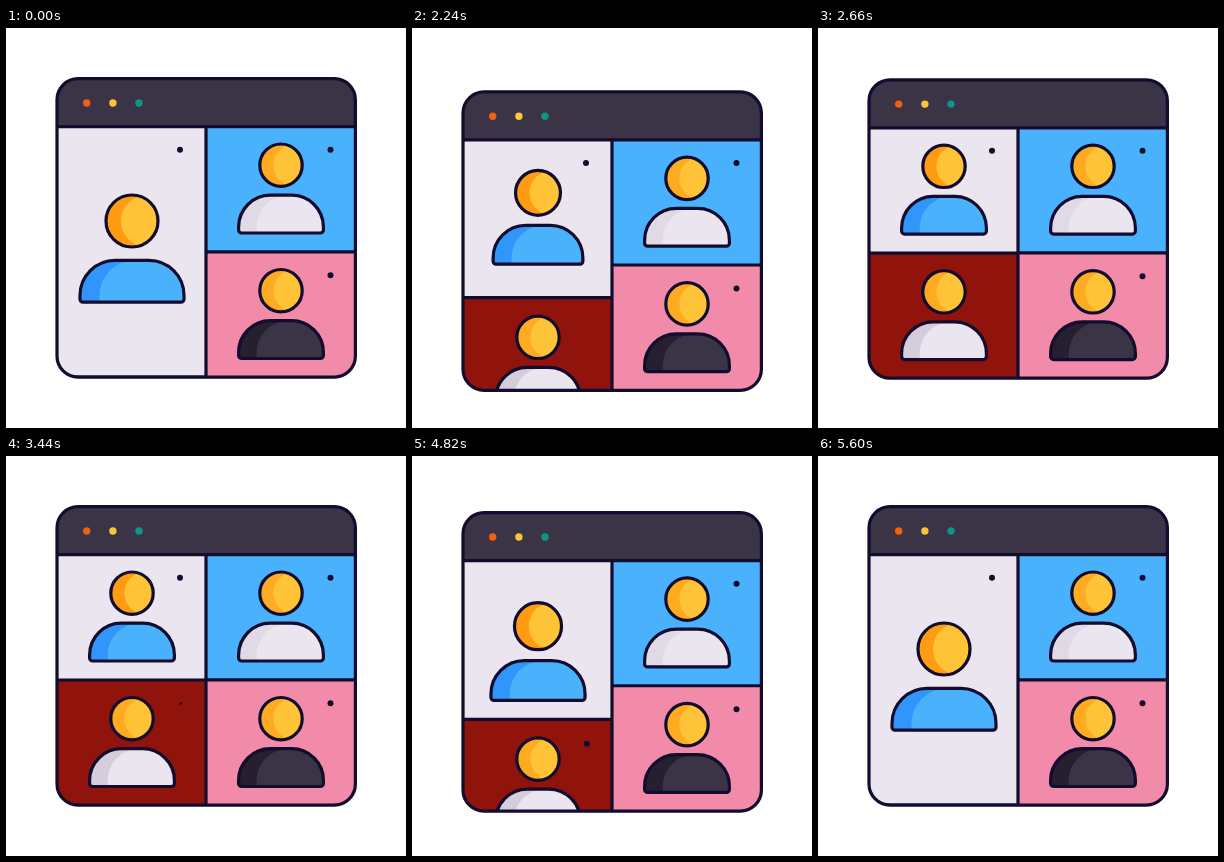
These frames come from a looping animation (400x400 px, 5.63 s). An HTML page with a canvas:

```html
<!DOCTYPE html>
<html lang="en">
<head>
<meta charset="utf-8">
<title>Video call window</title>
<style>
  html, body { margin: 0; width: 100%; height: 100%; overflow: hidden; background: #fff; }
  canvas { display: block; width: 400px; height: 400px; }
</style>
</head>
<body>
<canvas id="stage"></canvas>
<script>
const canvas = document.getElementById('stage');
const ctx = canvas.getContext('2d');
const ratio = window.devicePixelRatio || 1;
canvas.width = canvas.height = 400 * ratio;

const LOOP = 5630, OPEN = 2015, CLOSE = 4700;
const INK = '#120c2e', DARK = '#3b3446', PALE = '#ebe5ef', BLUE = '#4ab1fd';
const GOLD = '#ffc338', AMBER = '#ffab22';

const progress = (t, start, length) => Math.min(1, Math.max(0, (t - start) / length));
const easeOut = u => 1 - (1 - u) ** 2;
const easeSine = u => (1 - Math.cos(Math.PI * u)) / 2;
const mix = (a, b, u) => a + (b - a) * u;

// Quick dip followed by a softer return
function dip(t, start, height, down, up) {
  return t < start + down
    ? height * easeSine(progress(t, start, down))
    : height * (1 - easeOut(progress(t, start + down, up)));
}

function rect(x, y, w, h, color) {
  ctx.fillStyle = color;
  ctx.fillRect(x, y, w, h);
}

function dot(x, y, r, color = INK) {
  ctx.beginPath();
  ctx.arc(x, y, r, 0, 7);
  ctx.fillStyle = color;
  ctx.fill();
}

function line(x1, y1, x2, y2) {
  ctx.beginPath();
  ctx.moveTo(x1, y1);
  ctx.lineTo(x2, y2);
  ctx.stroke();
}

// Outlined shape whose lit part is the same shape shifted to the right
function shaded(path, shift, light, shade) {
  ctx.save();
  ctx.clip(path);
  ctx.fillStyle = shade;
  ctx.fill(path);
  ctx.translate(shift, 0);
  ctx.fillStyle = light;
  ctx.fill(path);
  ctx.restore();
  ctx.stroke(path);
}

function person(x, head, r, top, bottom, half, light, shade, headShade = AMBER) {
  const face = new Path2D();
  face.arc(x, head, r, 0, 7);
  shaded(face, mix(13.5, 15, (r - 21) / 5), GOLD, headShade);
  const body = new Path2D();
  const curve = (bottom - top) * 0.84;
  body.roundRect(x - half, top, half * 2, bottom - top, [curve, curve, 3, 3]);
  shaded(body, mix(18, 19.5, (r - 21) / 5), light, shade);
}

const smallPerson = (x, y, light, shade) =>
  person(x, y + 137.2, 21.2, y + 167.2, y + 205, 42.4, light, shade);

function draw(t) {
  const closing = t >= CLOSE;
  const dy = dip(t, 2000, 13.4, 260, 560) + dip(t, 3710, 4, 140, 310) + dip(t, CLOSE, 13.4, 260, 560);
  const figure = closing ? 1 - easeOut(progress(t, CLOSE, 430)) : easeOut(progress(t, OPEN, 460));
  const split = closing ? 1 - easeSine(progress(t, CLOSE, 350)) : easeOut(progress(t, OPEN, 460));
  const splitY = mix(349, 224, split);
  const lower = 125.5 + 129 * (1 - split);

  ctx.setTransform(ratio, 0, 0, ratio, 0, 0);
  rect(0, 0, 400, 400, '#fff');
  ctx.translate(0, dy);
  ctx.strokeStyle = INK;
  ctx.lineWidth = 3.2;
  ctx.lineJoin = 'round';

  const frame = new Path2D();
  frame.roundRect(51, 50.7, 298.4, 298.4, 21);
  ctx.save();
  ctx.clip(frame);
  rect(50, 50, 300, 50, DARK);
  rect(50, 98.5, 150, 251, PALE);
  rect(50, splitY, 150, 360 - splitY, '#90130c');
  rect(200, 98.5, 150, 126, BLUE);
  rect(200, 224, 150, 126, '#f28aaa');

  dot(80.7, 75, 3.7, '#f0620d');
  dot(106.9, 75, 3.7, '#ffc338');
  dot(133, 75, 3.7, '#0f9488');

  person(126, mix(193, 137.2, figure), mix(26, 21.2, figure),
    mix(232.4, 167.2, figure), mix(274.2, 205, figure),
    mix(52, 42.4, figure), BLUE, '#3096fb', '#ff9c12');
  smallPerson(126, lower, PALE, '#d5cddc');
  smallPerson(275, 0, PALE, '#e0d9e6');
  smallPerson(275, 125.5, DARK, '#251f2f');

  const leftDot = closing ? 1 - progress(t, CLOSE, 90) + easeOut(progress(t, 5270, 300)) : 1;
  dot(174, 121.7, 3 * leftDot);
  dot(174.8, 121.9 + lower, 3 * easeOut(progress(t, 3370, 300)));
  dot(324.5, 121.7, 3);
  dot(324.5, 247.2, 3);

  line(50, 98.7, 350, 98.7);
  line(50, splitY, 200, splitY);
  line(200, 223.8, 350, 223.8);
  line(200, 98.7, 200, 350);
  ctx.restore();
  ctx.stroke(frame);
}

function tick() {
  draw(performance.now() % LOOP);
  requestAnimationFrame(tick);
}
tick();
</script>
</body>
</html>
```
